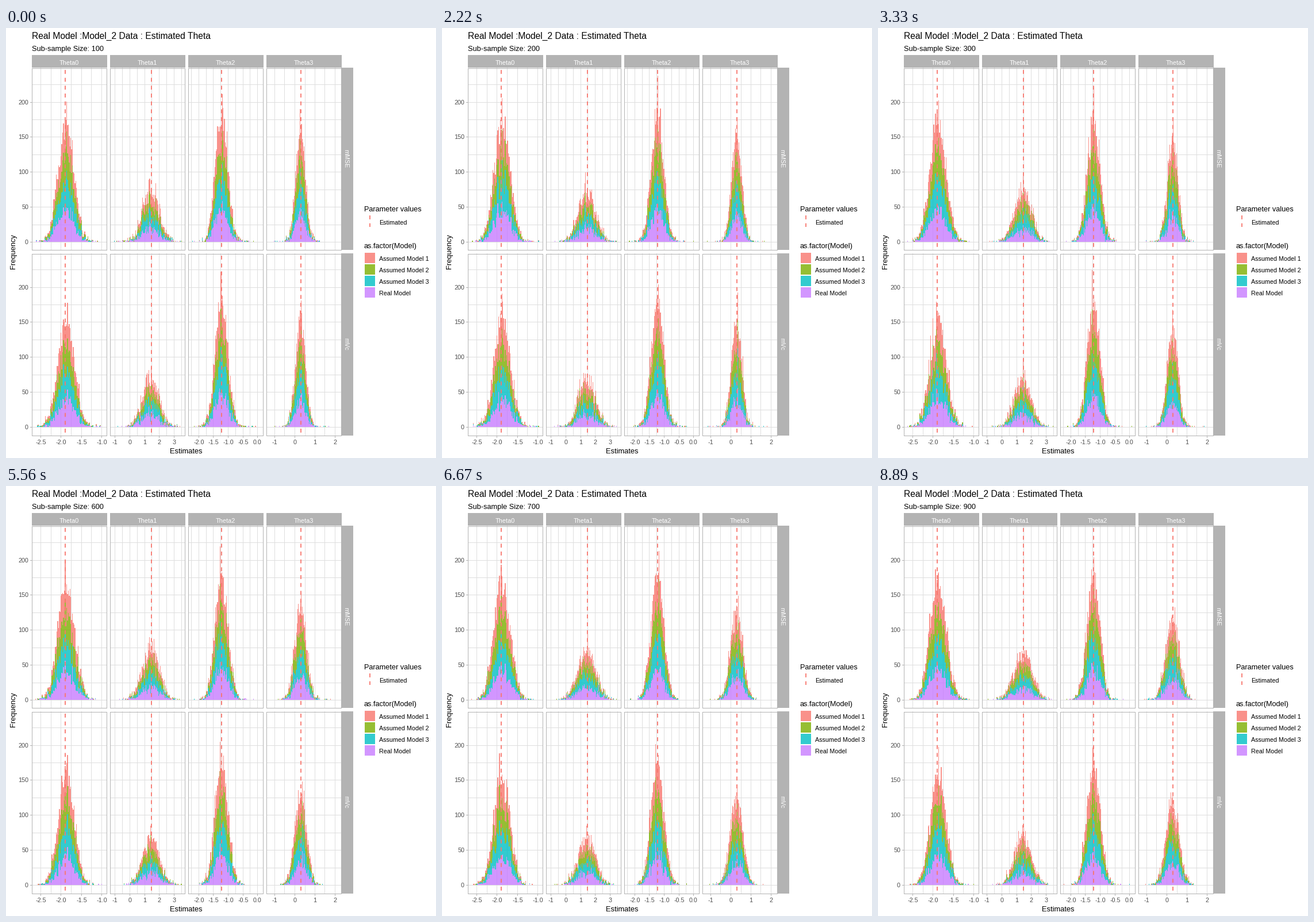
A matplotlib script for the animation above (10000 ms loop, 748 by 748 pixels).

```python
import numpy as np
import matplotlib.pyplot as plt
from matplotlib.animation import FuncAnimation
from matplotlib.patches import Rectangle

SIZE, DPI, STATES, LOOP_MS = 748, 100, 9, 10000
PX = 72 / DPI
UNIT = 1.2175  # pixels per count

GREY, GRID, AXIS_TEXT = "#B3B3B3", "#DEDEDE", "#4D4D4D"
DASH = "#F8766D"
MODELS = [("Assumed Model 1", "#F8766D"), ("Assumed Model 2", "#7CAE00"),
          ("Assumed Model 3", "#00BFC4"), ("Real Model", "#C77CFF")]

# left edge, x of value 0, pixels per unit, labelled values, dashed line x
COLS = [
    (45, 236.7, 70.7, [-2.5, -2.0, -1.5, -1.0], 103.5),
    (181, 214.8, 25.75, [-1, 0, 1, 2, 3], 253),
    (317, 437, 51, [-2.0, -1.5, -1.0, -0.5, 0.0], 375),
    (453, 502, 35, [-1, 0, 1, 2], 513),
]
WIDTH = 130
# top, bottom, zero line, strip label
ROWS = [(69, 385, 371.5, "mMSE"), (392, 708, 693.5, "mVc")]

# per panel: centre, spread, bin width (px), typical height at start and end
SHAPES = [
    [(104.5, 13.6, 1.42, 174, 164), (252, 14, 0.9, 76, 68),
     (375, 10.8, 1.2, 184, 176), (512.5, 8.5, 1.0, 160, 118)],
    [(104.5, 14, 1.42, 158, 164), (252, 14, 0.9, 72, 69),
     (375, 11, 1.2, 180, 172), (512.5, 8.6, 1.0, 156, 117)],
]
# tallest column per panel at the sizes below
SIZES = [100, 200, 300, 500, 700, 900]
PEAKS = [
    [[200, 205, 202, 204, 193, 186], [90, 99, 93, 86, 93, 75],
     [211, 237, 220, 225, 212, 203], [189, 178, 177, 156, 148, 132]],
    [[177, 190, 179, 182, 188, 197], [85, 95, 97, 84, 84, 85],
     [221, 203, 224, 208, 201, 196], [180, 192, 167, 152, 143, 132]],
]

rng = np.random.default_rng(7)

plt.rcParams["font.family"] = "Liberation Sans"
fig = plt.figure(figsize=(SIZE / DPI, SIZE / DPI), dpi=DPI, facecolor="white")
ax = fig.add_axes([0, 0, 1, 1])
ax.set_xlim(0, SIZE)
ax.set_ylim(SIZE, 0)
ax.axis("off")


def text(x, y, s, px, color="black", ha="left", va="baseline", **kw):
    return ax.text(x, y, s, fontsize=px * PX, color=color, ha=ha, va=va, **kw)


def line(x0, y0, x1, y1, color, z):
    ax.plot([x0, x1], [y0, y1], color=color, lw=PX, antialiased=False,
            solid_capstyle="butt", zorder=z)


def box(x, y, w, h, color, **kw):
    ax.add_patch(Rectangle((x, y), w, h, fc=color, lw=0, antialiased=False, **kw))


def dashes(x, y0, y1):
    ax.plot([x, x], [y0, y1], color=DASH, lw=1.8 * PX, zorder=5,
            dashes=(3.8, 3.8), dash_capstyle="butt")


def draw_panel(col, row):
    left, zero, scale, ticks, mark = col
    top, bottom, base, _ = row
    right = left + WIDTH
    step = (ticks[1] - ticks[0]) / 2
    for i in range(-1, 2 * len(ticks)):
        x = round(zero + scale * (ticks[0] + i * step)) + 0.5
        if left < x < right:
            line(x, top, x, bottom, GRID, 1)
    for count in range(0, 250, 25):
        y = round(base - UNIT * count - 0.5) + 0.5
        line(left, y, right, y, GRID, 1)
    ax.add_patch(Rectangle((left + 0.5, top + 0.5), WIDTH, bottom - top,
                           fill=False, ec=GREY, lw=PX, antialiased=False, zorder=6))
    dashes(mark, top + 4, bottom)


def draw_static():
    text(45, 19, "Real Model :Model_2 Data : Estimated Theta", 15.6)
    text(313.5, 740, "Estimates", 12.9, ha="center")
    text(13, 389, "Frequency", 12.9, ha="center", va="center", rotation=90)

    for j, col in enumerate(COLS):
        left, zero, scale, ticks, _ = col
        box(left, 47, WIDTH + 1, 22, GREY)
        text(left + 65, 63.5, f"Theta{j}", 10.9, "white", "center")
        for row in ROWS:
            draw_panel(col, row)
        for v in ticks:
            x = round(zero + scale * v) + 0.5
            line(x, 709, x, 712, GREY, 2)
            text(x, 724, str(v), 10.8, AXIS_TEXT, "center")

    for top, bottom, base, name in ROWS:
        box(583, top, 21, bottom - top + 1, GREY)
        text(591, (top + bottom) / 2, name, 10.8, "white", "center", "center",
             rotation=-90)
        for count in range(0, 201, 50):
            y = round(base - UNIT * count - 0.5) + 0.5
            line(42, y, 45, y, GREY, 2)
            text(39, y + 4.5, str(count), 10.8, AXIS_TEXT, "right")

    text(623, 319, "Parameter values", 12.8)
    dashes(633, 326, 346)
    text(649, 341.5, "Estimated", 10.8)
    text(623, 383, "as.factor(Model)", 12.7)
    for i, (name, color) in enumerate(MODELS):
        y = 391 + round(20.1 * i)
        box(624, y, 18, 18, color, alpha=0.8)
        text(649, y + 14, name, 10.8)


def bin_edges(r, c):
    left = COLS[c][0]
    return np.arange(left + 6, left + WIDTH - 5, SHAPES[r][c][2])


def stack(k, r, c):
    """Cumulative counts per model, Real Model at the bottom."""
    centre, spread, _, first, last = SHAPES[r][c]
    edges = bin_edges(r, c)
    t = k / (STATES - 1)
    height = first + (last - first) * t
    sd = spread * first / height
    z = ((edges[:-1] + edges[1:]) / 2 - centre) / sd
    tail = 0.006 + 0.026 * (1 - t) ** 3
    mean = height * ((1 - tail) * np.exp(-z**2 / 2)
                     + tail / 2.2 * np.exp(-(z / 2.2)**2 / 2))
    n = rng.poisson(mean / 4, (4, len(z))).astype(float)
    peak = np.interp(100 * (k + 1), SIZES, PEAKS[r][c])
    total = n.sum(axis=0)
    tallest = total.argmax()
    ratio = np.minimum(1, peak / np.maximum(total, 1))
    ratio[tallest] = peak / total[tallest]
    return np.cumsum(n * ratio, axis=0)


draw_static()
subtitle = text(45, 39.5, "", 12.8)
bars, stacks = {}, {}
for r in range(2):
    for c in range(4):
        edges = bin_edges(r, c)
        flat = np.full(len(edges) - 1, ROWS[r][2])
        bars[r, c] = [ax.stairs(flat, edges, baseline=flat, fill=True, color=color,
                                alpha=0.8, lw=0, antialiased=False, zorder=3)
                      for _, color in reversed(MODELS)]
        stacks[r, c] = [stack(k, r, c) for k in range(STATES)]


def update(k):
    subtitle.set_text(f"Sub-sample Size: {100 * (k + 1)}")
    for (r, c), layers in bars.items():
        base = ROWS[r][2]
        low = np.full(len(bin_edges(r, c)) - 1, base)
        for layer, counts in zip(layers, stacks[r, c][k]):
            high = base - UNIT * counts
            layer.set_data(values=high, baseline=low)
            low = high
    return [subtitle]


anim = FuncAnimation(fig, update, frames=STATES, interval=LOOP_MS / STATES,
                     repeat=True, repeat_delay=0, blit=False)
plt.show()
```
